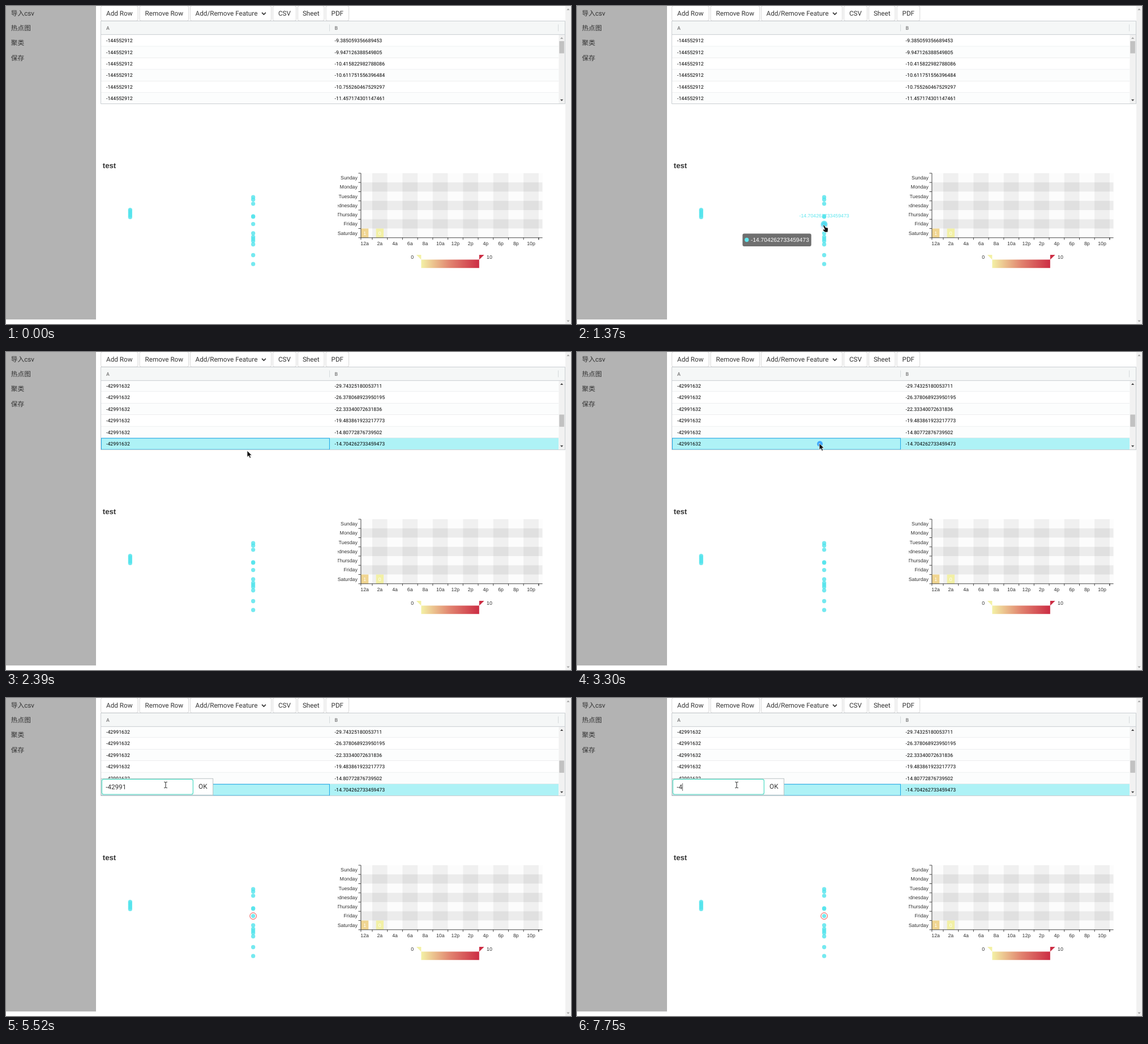
An HTML page for the animation above (8 s loop, 998 by 561 pixels).

```html
<!DOCTYPE html>
<html lang="en">
<head>
<meta charset="utf-8">
<title>Data table and charts</title>
<style>
  html, body { margin: 0; width: 100%; height: 100%; overflow: hidden; background: #fff; }
  svg { display: block; width: 998px; height: 561px; }
  text { font: 11.69px Roboto, "Noto Sans CJK SC", "Noto Sans CJK", sans-serif; fill: #333; text-rendering: geometricPrecision; white-space: pre; }
  .cell text { font-size: 8.77px; fill: #000; }
  .head { font-size: 8.77px; font-weight: 500; fill: #757575; }
  .chart text { font: 8.77px "Liberation Sans", Arial, sans-serif; }
  .chart .title { font-size: 13.15px; font-weight: bold; }
  .chart .tip { font-size: 10.23px; fill: #fff; }
  .chart .cyan { fill: #5fe6ee; }
  .chart .white { fill: #fff; }
</style>
</head>
<body>
<svg id="stage" viewBox="0 0 998 561" xmlns="http://www.w3.org/2000/svg">
  <defs>
    <clipPath id="rowClip"><rect x="168" y="50.8" width="819" height="121.2"/></clipPath>
    <clipPath id="plotClip"><rect x="586" y="285" width="402" height="200"/></clipPath>
    <linearGradient id="heat">
      <stop offset="0" stop-color="#f3f1a5"/>
      <stop offset=".5" stop-color="#e1836f"/>
      <stop offset="1" stop-color="#cc2d44"/>
    </linearGradient>
  </defs>
</svg>
<script>
const LOOP = 8000;
const ROW = 20.45;
const CYAN = '#52e4ec';
const stage = document.getElementById('stage');

function add(parent, tag, attrs = {}, content) {
  const node = document.createElementNS(stage.namespaceURI, tag);
  for (const key in attrs) node.setAttribute(key, attrs[key]);
  if (content !== undefined) node.textContent = content;
  parent.appendChild(node);
  return node;
}
const set = (node, attrs) => { for (const key in attrs) node.setAttribute(key, attrs[key]); };
const show = (node, on) => node.setAttribute('visibility', on ? 'visible' : 'hidden');
const group = (parent, attrs) => add(parent, 'g', attrs);
const box = (parent, x, y, width, height, fill, more) =>
  add(parent, 'rect', { x, y, width, height, fill, ...more });
const label = (parent, x, y, str, more) => add(parent, 'text', { x, y, ...more }, str);
const line = (parent, d, stroke, width = 0.8) =>
  add(parent, 'path', { d, stroke, 'stroke-width': width, fill: 'none' });
const shape = (parent, d, fill) => add(parent, 'path', { d, fill });
const dot = (parent, cx, cy, r = 3.65) =>
  add(parent, 'circle', { cx, cy, r, fill: CYAN, 'fill-opacity': 0.8 });

function drawPage() {
  box(stage, 0, 0, 159, 553, '#b3b3b3');
  ['导入csv', '热点图', '聚类', '保存'].forEach((s, i) => label(stage, 8.8, 17 + i * 26.2, s));

  box(stage, 988, 0, 10, 561, '#f1f1f1');
  shape(stage, 'M990.4 7.2h5.2l-2.6-3z', '#a3a3a3');
  shape(stage, 'M990.4 554.6h5.2l-2.6 3z', '#a3a3a3');

  const buttons = [[167.6, 233, 'Add Row'], [236, 322.6, 'Remove Row'], [325.4, 468.6, 'Add/Remove Feature'],
    [471.4, 512.6, 'CSV'], [515.4, 562, 'Sheet'], [565, 605.6, 'PDF']];
  for (const [x, end, s] of buttons) {
    box(stage, x, -0.4, end - x, 26.6, '#fff', { rx: 2.9, stroke: '#ccc', 'stroke-width': 0.8 });
    const wide = s.length > 12;
    label(stage, wide ? x + 9.2 : (x + end) / 2, 17.1, s, { 'text-anchor': wide ? 'start' : 'middle' });
  }
  line(stage, 'M452 11.6l3.4 3.4l3.4-3.4', '#333', 1.7);
}

function drawRows(parent, top, first, rows, tint) {
  const g = group(parent, { class: 'cell' });
  rows.forEach((value, i) => {
    const y = top + i * ROW;
    const picked = value === '-14.704262733459473';
    box(g, 168, y, 808, ROW, picked ? '#aef2f6' : i % 2 === tint ? '#fcfdfd' : '#fff');
    line(g, `M168 ${y + ROW}H976`, '#d5d8da');
    label(g, 177, y + 13.3, first);
    label(g, 580.6, y + 13.3, value);
    if (picked) box(g, 168.4, y + 0.3, 403, ROW - 0.6, 'none', { stroke: '#0a9fe8', 'stroke-width': 0.9 });
  });
  return g;
}

function drawTable() {
  box(stage, 167.5, 26.5, 820, 146, '#fff');
  box(stage, 168, 27, 819, 23.5, '#f5f7f7');
  label(stage, 177, 41.8, 'A', { class: 'head' });
  label(stage, 580.6, 41.8, 'B', { class: 'head' });
  line(stage, 'M571.5 32.5V44.5M975.5 32.5V44.5', '#cdd2d5');

  const clip = group(stage, { 'clip-path': 'url(#rowClip)' });
  const before = drawRows(clip, 50.8, '-144552912', ['-9.385059356689453', '-9.947126388549805',
    '-10.415822982788086', '-10.611751556396484', '-10.755260467529297', '-11.457174301147461'], 1);
  const after = drawRows(clip, 49.6, '-42991632', ['-29.74325180053711', '-26.378068923950195',
    '-22.33340072631836', '-19.483861923217773', '-14.80772876739502', '-14.704262733459473'], 0);

  box(stage, 976.4, 51, 10.8, 121, '#f1f1f1');
  const thumb = box(stage, 977.3, 62, 8.6, 21.5, '#c1c1c1');
  const up = shape(stage, 'M979 58h5.2l-2.6-3z', '#a3a3a3');
  shape(stage, 'M979 164.7h5.2l-2.6 3z', '#404040');
  line(stage, 'M168 50.4H987', '#bdc3c7');
  box(stage, 167.6, 26.6, 819.8, 145.8, 'none', { stroke: '#bdc3c7', 'stroke-width': 0.8 });
  return { before, after, thumb, up };
}

function drawScatter() {
  const g = group(stage, { class: 'chart' });
  label(g, 170.8, 286, 'test', { class: 'title' });
  [359.6, 362, 364.6, 367.2, 369.8, 372.4].forEach(y => dot(g, 219.3, y));
  [337.2, 341.5, 348.8, 370.9, 371.8, 384.6, 401, 407.5, 411, 414.4, 420.5, 439.5, 455.2]
    .forEach(y => dot(g, 436.6, y));
  const hover = dot(g, 436.6, 384.6);
  const ring = add(g, 'circle', { cx: 436.6, cy: 384.6, r: 4, fill: 'none', stroke: '#e8322f', 'stroke-width': 0.9 });
  const name = label(g, 436.6, 373.2, '', { class: 'cyan', 'text-anchor': 'middle' });
  const tip = group(g);
  const frame = box(tip, 292.4, 401.6, 121.4, 22.4, '#323232', { rx: 2.9, 'fill-opacity': 0.7 });
  add(tip, 'circle', { cx: 299.8, cy: 412.5, r: 3.65, fill: '#5fe6ee' });
  const tipText = label(tip, 307, 416.1, '', { class: 'tip' });
  return { hover, ring, name, tip, frame, tipText };
}

function drawHeatmap() {
  const g = group(stage, { class: 'chart', 'clip-path': 'url(#plotClip)' });
  const left = 626.9, top = 295, right = 947.6, bottom = 408.8;
  const step = (right - left) / 24, rowH = (bottom - top) / 7;
  const shade = odd => odd ? '#c8c8c8' : '#fafafa';
  let ticks = '', x = left;
  for (let i = 0; i < 13; i++) {
    const end = Math.min(right, left + (1.5 + 2 * i) * step);
    box(g, x, top, end - x, bottom - top, shade(i % 2), { 'fill-opacity': i % 2 ? 0.37 : 0.5 });
    ticks += `M${x} ${bottom}v3.65`;
    x = end;
  }
  ticks += `M${left + 23.5 * step} ${bottom}v3.65`;

  const days = ['Sunday', 'Monday', 'Tuesday', 'Wednesday', 'Thursday', 'Friday', 'Saturday'];
  days.forEach((day, i) => {
    const y = top + i * rowH;
    box(g, left, y, right - left, rowH, shade(i % 2), { 'fill-opacity': 0.3 });
    label(g, 620.8, y + rowH / 2 + 3, day, { 'text-anchor': 'end' });
    ticks += `M${left} ${y}h-4.4`;
  });

  [[0, '#f0d591', '1'], [2, '#f2f0a5', '0']].forEach(([col, fill, s]) => {
    const cx = left + (col + 0.5) * step;
    box(g, cx - step / 2, bottom - rowH, step, rowH, fill);
    label(g, cx, bottom - rowH / 2 + 3, s, { class: 'white', 'text-anchor': 'middle' });
  });

  line(g, `M${left} ${top}V${bottom}H${right}M${left} ${bottom}h-4.4${ticks}`, '#333', 0.9);
  for (let h = 0; h < 24; h += 2) {
    label(g, left + (h + 0.5) * step, 422.3, (h % 12 || 12) + (h < 12 ? 'a' : 'p'), { 'text-anchor': 'middle' });
  }

  box(g, 733.4, 447.4, 102.4, 14.8, 'url(#heat)');
  shape(g, 'M724.8 439h8.6v8.4z', '#f3f1a5');
  shape(g, 'M844.6 439h-8.8v8.4z', '#cc2d44');
  label(g, 720.2, 446.2, '0', { 'text-anchor': 'end' });
  label(g, 849, 446.2, '10');
}

function drawEditor() {
  const g = group(stage);
  box(g, 168, 142.2, 197.6, 29, '#fff', { stroke: '#b9c0c2', 'stroke-width': 1 });
  box(g, 169.4, 143.4, 161, 26.6, '#fff', { rx: 2.9, stroke: '#4fdcc4', 'stroke-width': 1.2 });
  label(g, 347.8, 160.1, 'OK', { 'text-anchor': 'middle' });
  const text = label(g, 176.2, 160.6, '');
  const caret = box(g, 0, 150.4, 0.8, 13.4, '#444');
  return { g, text, caret };
}

function drawPointer() {
  const click = add(stage, 'circle', { fill: '#1e90ff' });
  const g = group(stage);
  const edge = { stroke: '#fff', 'stroke-width': 0.8, 'stroke-linejoin': 'round', fill: '#111' };
  const arrow = add(g, 'path', { d: 'M0 0V11.4L2.7 9L4.6 13.2L6.7 12.3L4.9 8.2H8.4Z', ...edge });
  const hand = add(g, 'path', {
    d: 'M-.8 .6Q.4-1.2 1.8 .5L3.9 3.9L7 4.3Q8.5 5 8.1 7.2L7.6 12.3H2.6L-1.2 8.6Q-1.4 7 .2 7.1L2 7.6Z', ...edge });
  const beam = line(g, 'M-2.8-5.2Q0-5.4 0-4Q0-5.4 2.8-5.2M0-4.2V4.2M-2.8 5.2Q0 5.4 0 4Q0 5.4 2.8 5.2', '#222', 1);
  return { g, click, arrow, hand, beam };
}

drawPage();
const table = drawTable();
const scatter = drawScatter();
drawHeatmap();
const editor = drawEditor();
const pointer = drawPointer();

const clamp = v => Math.max(0, Math.min(1, v));
const part = (t, from, to) => clamp((t - from) / (to - from));
const mix = (a, b, p) => a + (b - a) * p;
const easeOut = (p, n) => 1 - (1 - p) ** n;
const elastic = p => p <= 0 ? 0 : p >= 1 ? 1 : 1 + 2 ** (-10 * p) * Math.sin((p - 0.1) * 5 * Math.PI);

// Pointer stops: time, x, y, easing power on the way there.
const path = [[1900, 435.4, 386.8, 1], [1960, 431.6, 329.6, 1], [2670, 425.6, 164, 3], [2710, 428.8, 161.6, 1],
  [2870, 428.4, 160.6, 0], [3120, 428, 161.2, 0], [4170, 428, 161.2, 0], [4630, 282, 153.4, 4.9]];

function pointerAt(t) {
  let [time, x, y] = path[0];
  for (const [end, nx, ny, power] of path) {
    if (t < end) {
      const p = power ? easeOut(part(t, time, end), power) : 0;
      return [mix(x, nx, p), mix(y, ny, p)];
    }
    [time, x, y] = [end, nx, ny];
  }
  return [x, y];
}

const deletes = [5220, 5360, 5440, 5700, 5950, 6230, 6550];
const caretFlips = [4270, 4770, 5480, 5950, 7160, 7750];
const passed = (list, t) => list.filter(v => t >= v).length;

function render(t) {
  const scrolled = t >= 1470;
  show(table.before, !scrolled);
  show(table.after, scrolled);
  set(table.thumb, { y: scrolled ? 110.4 : 62 });
  set(table.up, { fill: scrolled ? '#404040' : '#a3a3a3' });

  const hovering = t >= 90 && t < 2080;
  const second = t >= 1940;
  const value = second ? '-11.738162994384766' : '-14.704262733459473';
  show(scatter.name, hovering);
  show(scatter.tip, hovering);
  scatter.name.textContent = scatter.tipText.textContent = value;
  set(scatter.name, { y: second ? 361.4 : 373.2 });
  set(scatter.frame, { width: second ? 120.6 : 121.4 });
  const grow = t < 1960 ? elastic(part(t, 90, 580)) : 1 - elastic(part(t, 1960, 2300));
  set(scatter.hover, { r: 3.65 + 2.2 * grow });
  show(scatter.hover, t >= 90 && t < 2300);
  show(scatter.ring, t >= 4170);
  set(scatter.ring, { r: mix(3.6, 5.8, part(t, 4170, 4630)) });

  show(editor.g, t >= 3560);
  const gone = passed(deletes, t);
  editor.text.textContent = '-42991632'.slice(0, 9 - gone);
  set(editor.caret, { x: 232.2 - gone * 6.57 });
  show(editor.caret, t >= 3560 && passed(caretFlips, t) % 2 === 0);

  const [x, y] = pointerAt(t);
  const start = t < 3300 ? 1120 : 3300;
  const p = part(t, start, start + 550);
  set(pointer.click, { cx: x + 1, cy: y + 0.8, r: mix(5, 9, p), 'fill-opacity': 0.75 * (1 - p) ** 3 });
  show(pointer.click, t >= start && p < 1);
  set(pointer.g, { transform: `translate(${x} ${y})` });
  const kind = t < 90 ? '' : t >= 4170 && x < 330 ? 'beam' : y > 325 ? 'hand' : 'arrow';
  for (const k of ['arrow', 'hand', 'beam']) show(pointer[k], k === kind);
}

const begin = performance.now();
function tick() {
  render((performance.now() - begin) % LOOP);
  requestAnimationFrame(tick);
}
tick();
</script>
</body>
</html>
```
